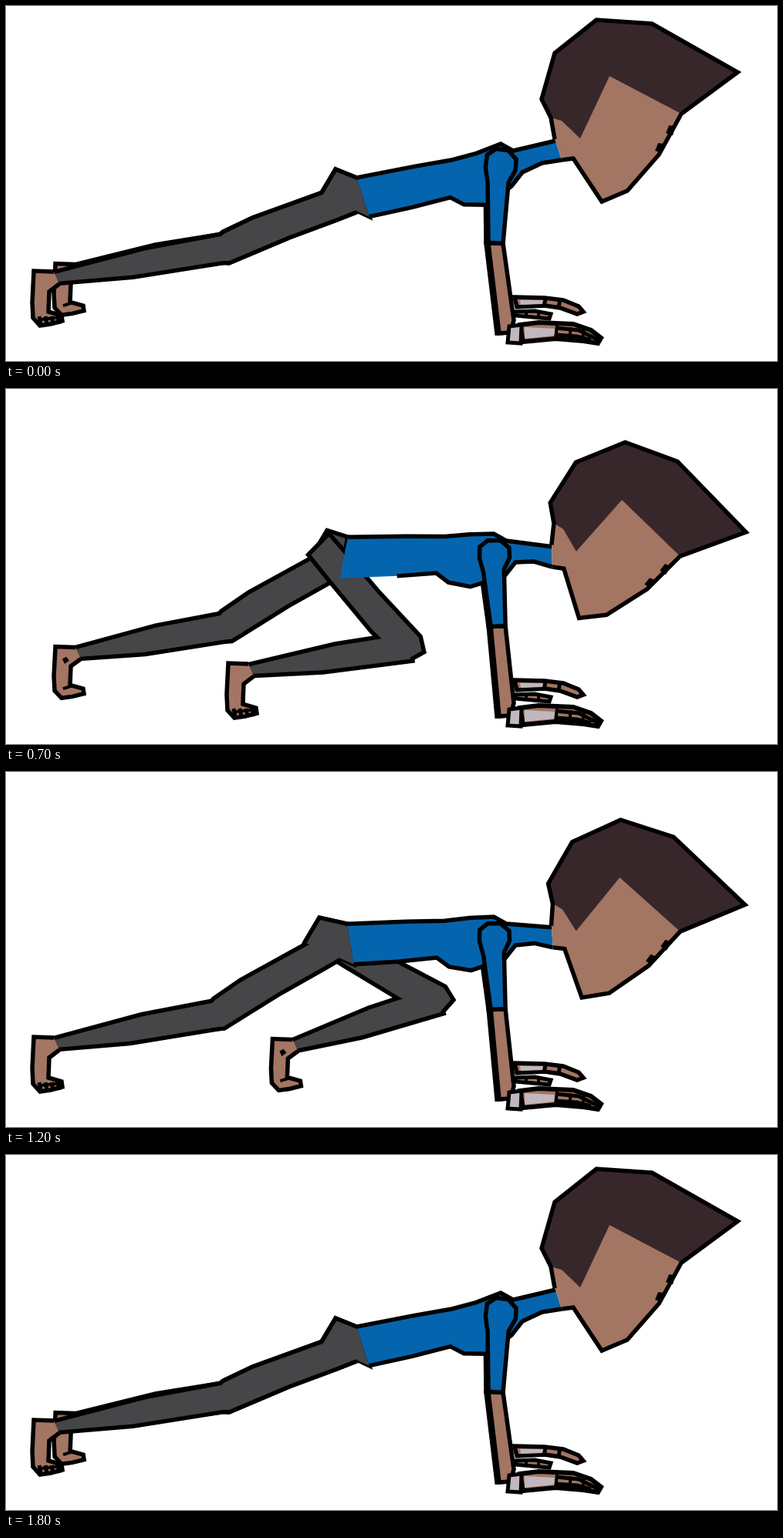
These frames come from a looping animation (999x461 px, 1900 ms). An HTML page with a canvas:

```html
<!DOCTYPE html>
<html>
<head>
<meta charset="utf-8">
<style>
html, body { margin: 0; width: 100%; height: 100%; overflow: hidden; background: #fff; }
canvas { display: block; }
</style>
</head>
<body>
<canvas id="stage" width="999" height="461"></canvas>
<script>
const ctx = document.getElementById('stage').getContext('2d');
const LOOP = 1900, STEP = 100, SWING = 1120, FAR_DELAY = 700, LINE = 5.5, RAD = Math.PI / 180;
const SKIN = '#a37563', HAIR = '#38272a', PANTS = '#464548', SHIRT = '#0465ae', BAND = '#c0b8be';

// how far the chest and head are lowered: [time, amount]
const DIP = [[0, 0], [300, .83], [500, 1], [800, 1.23], [1200, 1], [1600, .56], [1800, 0]];

// head relative to its back corner, clockwise from the neck
const HEAD = [[17, 52], [12, 24], [0, 0], [17, -60], [71, -103], [143, -98], [254, -35], [181, 19],
  [152, 72], [111, 119], [78, 133], [41, 77], [26, 79]];
const HAIRLINE = [[88, -30], [50, 51], [26, 28]];
// trunk along the spine
const BACK = [[24, -21], [100, -18], [150, -15], [182, -16]];
const BELLY = [[179, 52], [151, 45], [136, 32], [85, 33]];
// limbs: fraction along the bone, pixels across it
const THIGH = [[-.11, 11], [-.12, -22], [.1, -21], [.5, -18], [1, -18], [1.1, -9], [1.07, 10], [.95, 17], [.7, 19], [.15, 14]];
const CALF = [[0, 16], [.45, 15], [1, 5], [1, -5], [.55, -14], [0, -16]];
const UPPER_ARM = [[.1, 20], [-.05, 19], [-.13, 8], [-.12, -8], [-.02, -19], [.11, -19], [.26, -11], [1, -9], [1, 10], [.28, 16]];
const FOOT = [[-2, -8], [-28, -9], [-30, 32], [-29, 52], [-20, 62], [-6, 60], [9, 56], [8, 49], [-9, 44], [-8, 18], [5, 8]];

const clamp = v => Math.max(0, Math.min(1, v));
const shift = (pts, [x, y]) => pts.map(p => [p[0] + x, p[1] + y]);
function turn(pts, [x, y], angle) {
  const c = Math.cos(angle), s = Math.sin(angle);
  return pts.map(([u, v]) => [x + u * c - v * s, y + u * s + v * c]);
}
function along(pts, a, b) {
  const dx = b[0] - a[0], dy = b[1] - a[1], n = Math.hypot(dx, dy);
  return pts.map(([u, v]) => [a[0] + dx * u - dy / n * v, a[1] + dy * u + dx / n * v]);
}
function trace(pts, close) {
  ctx.beginPath();
  pts.forEach(p => ctx.lineTo(...p));
  if (close) ctx.closePath();
}
function fill(pts, color) {
  trace(pts, true);
  ctx.fillStyle = color;
  ctx.fill();
}
function line(pts, width = LINE, close = false) {
  trace(pts, close);
  ctx.lineWidth = width;
  ctx.stroke();
}
function shape(pts, color, width = LINE) {
  fill(pts, color);
  line(pts, width, true);
}
const border = pts => line(pts, LINE * 2, true);
const pants = pts => fill(pts, PANTS);

function dipAt(t) {
  const i = Math.max(1, DIP.findIndex(([time]) => time >= t));
  const [t0, a] = DIP[i - 1], [t1, b] = DIP[i], k = (t - t0) / (t1 - t0);
  return a + (b - a) * k * k * (3 - 2 * k);
}

// the foot swings forward and back once; the thigh turns with it
function legPose(time, dip, dx, dy) {
  const phase = clamp(time / SWING);
  const reach = Math.sin(Math.PI * phase) ** 2.7;
  const rest = 157 - 9 * dip;
  const lift = phase < .5 ? 20 * Math.sin(Math.PI * reach) : 0;
  return {
    reach,
    thigh: (rest + (23 - rest) * reach) * RAD,
    length: 168 - 18 * reach * reach,
    ankle: [64 + 312 * reach + dx * (1 - .7 * reach), 353 + 15 * reach - lift + dy]
  };
}
const passing = leg => clamp(2 * Math.sin(leg.thigh) - 1);
function legParts({ thigh, length, ankle }, hip) {
  const [knee] = turn([[length, 0]], hip, thigh);
  return [along(THIGH, hip, knee), along(CALF, knee, ankle)];
}

function drawFoot(ankle, size) {
  const place = pts => shift(pts.map(([x, y]) => [x, y * size]), ankle);
  fill(place(FOOT), SKIN);
  line(place(FOOT));
  return place;
}
function drawNearFoot(ankle) {
  const place = drawFoot(ankle, 1);
  for (let x = -21; x < 8; x += 8) line(place([[x, 50], [x + 2, 60]]), 5);
  line(place([[-18, 54], [8, 51]]), 4);
}
function drawFarFoot(ankle) {
  const place = drawFoot(ankle, .94);
  line(place([[-18, 49], [-6, 45]]), 4);
  fill(place([[-19, 8], [-14, 5], [-10, 10], [-16, 15]]), '#000');
}

function drawFarHand() {
  shape([[660, 397], [685, 396], [706, 400], [704, 406], [660, 402]], SKIN, 5);
  for (const x of [674, 690]) line([[x, 396], [x, 405]], 4);
  shape([[659, 378], [698, 379], [722, 382], [742, 390], [748, 397], [740, 400], [718, 392], [698, 389], [662, 391]], SKIN);
  fill([[666, 382], [696, 382], [695, 387], [667, 388]], BAND);
  for (const x of [699, 718]) line([[x, 380], [x - 2, 391]], 5);
}
function drawNearHand() {
  shape([[666, 414], [690, 411], [735, 413], [758, 421], [771, 431], [767, 438], [748, 435], [712, 432], [670, 436]], SKIN, 6);
  fill([[672, 417], [711, 419], [710, 428], [672, 432]], BAND);
  line([[712, 418], [742, 421], [768, 434]], 5);
  line([[712, 427], [740, 429], [758, 434]], 5);
  for (const x of [714, 732, 749]) line([[x, 415 + (x - 714) / 8], [x - 2, 433]], 4);
  shape([[652, 416], [668, 414], [667, 438], [650, 437]], BAND, 5);
}

function drawArm([sx, sy], dx) {
  const ex = 635 + (sy - 200) * .35;
  const move = pts => shift(pts, [dx, 0]);
  shape(move([[ex - 10, 308], [ex + 9, 308], [658, 408], [654, 424], [639, 425]]), SKIN);
  shape(move(along(UPPER_ARM, [sx, sy], [ex, 308])), SHIRT);
}

function drawHead(place) {
  fill(place([[18, 54], ...HEAD]), SKIN);
  fill(place([...HEAD.slice(1, 8), ...HAIRLINE]), HAIR);
  line(place(HEAD));
  for (const eye of [[168, 40], [154, 63]])
    fill(place(shift([[-3, -6], [5, -5], [2, 7], [-7, 4]], eye)), '#000');
}

function draw(t) {
  const dip = dipAt(t), low = Math.min(1, dip);
  const near = legPose(t, low, 0, 0), far = legPose(t - FAR_DELAY, low, 28, -10);
  const bent = near.thigh < 125 * RAD;

  // the hips rise while a knee passes under them; the head turns about the shoulder
  const rise = 14 * Math.max(passing(near), passing(far));
  const hip = [436 - 16 * low, 249 - 22 * low - rise];
  const nearHip = [hip[0] - 5 * low, hip[1]], farHip = [hip[0] + 5 * low, hip[1]];
  const shoulder = [642 - 9 * low * low, 200 + 9 * low * low];
  const spine = Math.atan2(shoulder[1] - hip[1], shoulder[0] - hip[0]);
  const onSpine = pts => turn(pts, [hip[0], hip[1] - 6 * low], spine);
  const onHead = pts => turn(shift(pts, [52, -79]), shoulder, 14 * dip * RAD);

  const [neckTop, neckLow] = onHead([[18, 54], [26, 79]]);
  const [crest, nape, throat, armpit] = shift([[-1, -21], [15, -12], [27, 16], [13, 34]], shoulder);
  const underNeck = [(neckLow[0] + throat[0]) / 2, (neckLow[1] + throat[1]) / 2 - 4];
  const top = [...onSpine(BACK), crest, nape, neckTop];
  const front = [neckLow, underNeck, throat, armpit, ...onSpine(BELLY)];
  const [waistLow] = onSpine([[28 - 26 * near.reach ** 2, 32]]);
  const [fold, seat] = shift([[-28, -5], [-9, -37]], bent ? farHip : nearHip);
  const pelvis = [fold, seat, top[0], waistLow];

  ctx.fillStyle = '#fff';
  ctx.fillRect(0, 0, 999, 461);

  const farParts = legParts(far, farHip);
  farParts.forEach(border);
  farParts.forEach(pants);
  drawFarFoot(far.ankle);
  drawFarHand();
  drawArm(shoulder, -3);

  const nearParts = legParts(near, nearHip);
  shape(pelvis, PANTS);
  nearParts.forEach(border);
  if (!bent) pants(pelvis);
  nearParts.forEach(pants);
  fill([...top, ...front, waistLow], SHIRT);
  line(bent ? top : [fold, seat, ...top]);
  line(bent ? front : [...front, waistLow]);
  drawNearFoot(near.ankle);

  drawHead(onHead);
  drawArm(shoulder, 0);
  drawNearHand();
}

function tick() {
  const t = Math.floor(performance.now() % LOOP / STEP) * STEP;
  draw(t < 200 ? 0 : t);
  requestAnimationFrame(tick);
}
tick();
</script>
</body>
</html>
```
